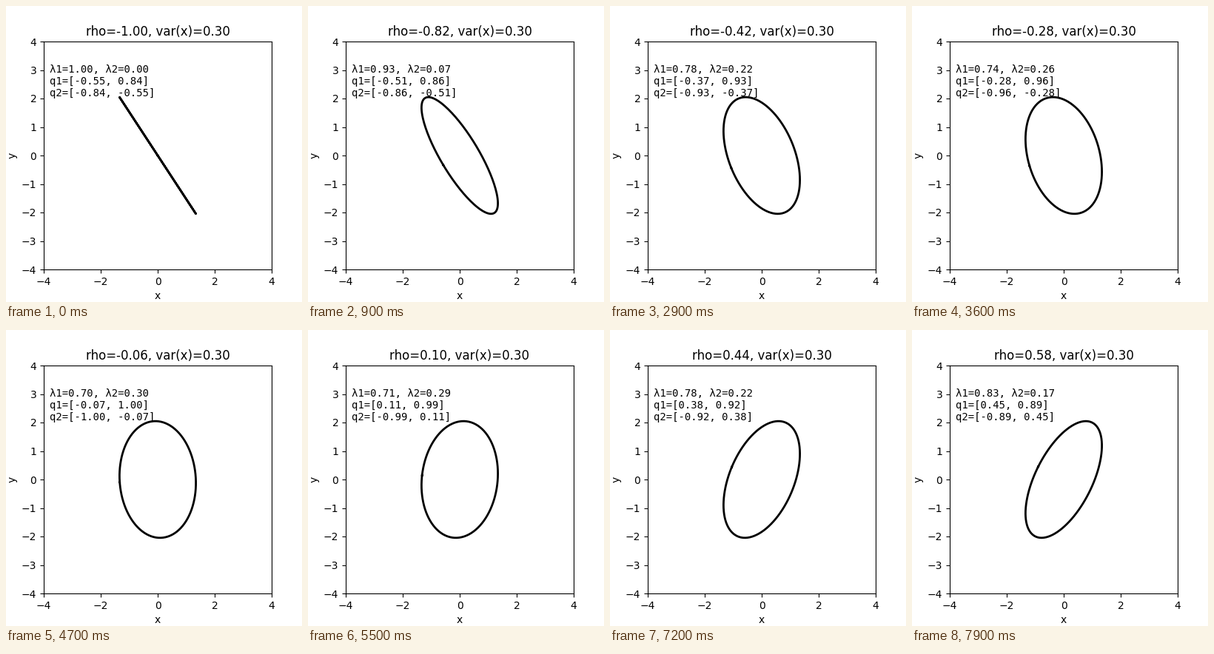
These frames come from a looping animation (400x400 px, 8000 ms). A matplotlib script:

```python
import matplotlib.pyplot as plt
import numpy as np
from matplotlib.animation import FuncAnimation

FRAMES = 80
VAR_X, VAR_Y = 0.3, 0.7
CHI2_95 = 5.991  # 95% quantile, two degrees of freedom

fig, ax = plt.subplots(figsize=(4, 4), dpi=100)
ax.set_aspect("equal")
ax.set(xlim=(-4, 4), ylim=(-4, 4), xlabel="x", ylabel="y",
       xticks=range(-4, 5, 2), yticks=range(-4, 5))

angle = np.linspace(0, 2 * np.pi, 200)
curve, = ax.plot([], [], color="black", lw=2)
label = ax.text(-3.8, 2, "", family="DejaVu Sans Mono", va="bottom")
title = ax.set_title("")


def eigen(rho):
    """Eigenvalues and unit eigenvectors of the covariance, largest first."""
    cov = rho * np.sqrt(VAR_X * VAR_Y)
    mean = (VAR_X + VAR_Y) / 2
    radius = np.hypot((VAR_Y - VAR_X) / 2, cov)
    tilt = np.arctan2(2 * cov, VAR_Y - VAR_X) / 2
    s, c = np.sin(tilt), np.cos(tilt)
    return mean + radius, abs(mean - radius), np.array([s, c]), np.array([-c, s])


def vec(v):
    return f"[{v[0]:.2f}, {v[1]:.2f}]"


def update(i):
    rho = (i - 50) / 50
    l1, l2, q1, q2 = eigen(rho)
    points = (np.outer(q2, np.sqrt(CHI2_95 * l2) * np.cos(angle))
              + np.outer(q1, np.sqrt(CHI2_95 * l1) * np.sin(angle)))
    curve.set_data(*points)
    label.set_text(f"λ1={l1:.2f}, λ2={l2:.2f}\nq1={vec(q1)}\nq2={vec(q2)}")
    title.set_text(f"rho={rho:.2f}, var(x)={VAR_X:.2f}")
    return curve, label, title


anim = FuncAnimation(fig, update, frames=FRAMES, interval=100, repeat=True,
                     repeat_delay=0)
plt.show()
```
